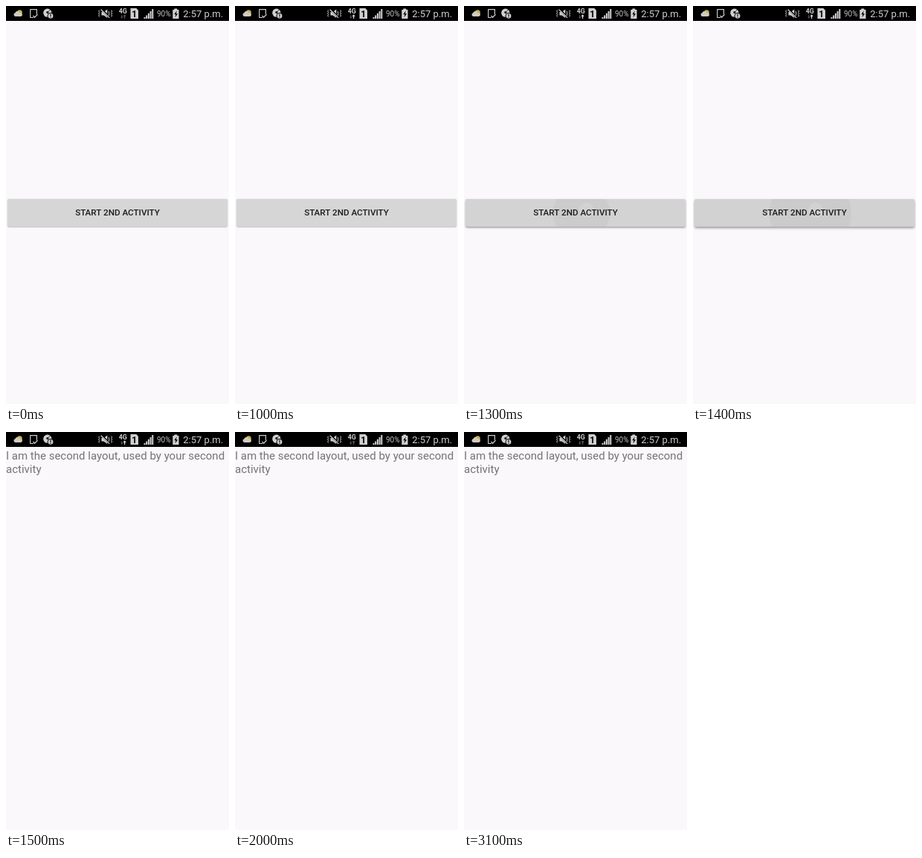
These frames come from a looping animation (300 px wide and 534 px high, 4.2 s). An HTML page:

```html
<!DOCTYPE html>
<html lang="en">
<head>
<meta charset="utf-8">
<title>Second activity</title>
<style>
  html, body { margin: 0; width: 100%; height: 100%; overflow: hidden; background: #faf8fb; }
  body { position: relative; font-family: Roboto, sans-serif; }
  .status { position: absolute; left: 0; top: 0; width: 300px; height: 20px; background: #000; }
  .screen { position: absolute; left: 0; top: 20px; width: 300px; height: 514px; overflow: hidden; }

  .first, .second, .button, .tint, .ripple, .touch, .up {
    animation: 4200ms step-end infinite;
  }
  .button {
    position: absolute; left: 2px; top: 239px; width: 296px; height: 37px;
    border-radius: 2px; background: #d6d6d7; overflow: hidden;
    animation-name: lift;
  }
  .label {
    position: absolute; left: 0; width: 100%; top: 0; line-height: 37px;
    text-align: center; font-size: 11.67px; font-weight: 500; color: #1c1c1c;
    white-space: nowrap;
  }
  .tint { position: absolute; inset: 0; background: rgba(0, 0, 0, .02); animation-name: press; }
  .ripple {
    position: absolute; left: 101px; top: -36px; width: 110px; height: 110px;
    border-radius: 50%; background: rgba(0, 0, 0, .03); animation-name: grow;
  }
  .touch {
    position: absolute; left: 153px; top: 5px; width: 20px; height: 20px;
    border-radius: 50%; background: rgba(255, 255, 255, .15); animation-name: press;
  }
  .second {
    position: absolute; left: 0; top: 3px; font-size: 15px; line-height: 18px;
    color: #747474; white-space: nowrap; animation-name: arrive;
  }
  .first { animation-name: leave; }
  .up { animation-name: upload; }

  @keyframes leave { 0% { visibility: visible } 35.714%, 100% { visibility: hidden } }
  @keyframes arrive { 0% { visibility: hidden } 35.714%, 100% { visibility: visible } }
  @keyframes press { 0% { opacity: 0 } 28.571% { opacity: .5 } 30.952% { opacity: .8 } 33.333%, 100% { opacity: 1 } }
  @keyframes grow {
    0% { transform: scale(0) }
    28.571% { transform: scale(.35) }
    30.952% { transform: scale(.7) }
    33.333%, 100% { transform: scale(1) }
  }
  @keyframes lift {
    0% { box-shadow: 0 .5px 1.5px rgba(0, 0, 0, .38) }
    28.571% { box-shadow: 0 1px 2px rgba(0, 0, 0, .38) }
    30.952% { box-shadow: 0 1.5px 2.5px rgba(0, 0, 0, .38) }
    33.333%, 100% { box-shadow: 0 2px 3.5px rgba(0, 0, 0, .38) }
  }
  @keyframes upload { 0% { fill: #555 } 23.809% { fill: #ddd } 47.619%, 100% { fill: #555 } }
</style>
</head>
<body>
<svg class="status" width="300" height="20" viewBox="0 0 300 20" fill="#d0d0d0" font-family="Roboto, sans-serif">
  <!-- weather -->
  <circle cx="18.3" cy="8.8" r="3.5" fill="#cdb04c"/>
  <path d="M12.5 14a2.4 2.4 0 0 1-.2-4.7a3.3 3.3 0 0 1 6.2-.2a2.5 2.5 0 0 1 1.6 4.9z" fill="#cfccc0"/>
  <!-- document -->
  <path d="M37 15.5H32.7V4.7H41.4V11" fill="none" stroke="#c8c8c8" stroke-width="1.2"/>
  <path d="M36.5 13l2 2.2 4-4" fill="none" stroke="#c8c8c8" stroke-width="1.3"/>
  <!-- disc with alert -->
  <circle cx="55.8" cy="9.2" r="5.6"/>
  <circle cx="55.8" cy="8.6" r="1.5" fill="#000"/>
  <path d="M56 8.5L59.5 5" stroke="#000" stroke-width=".8"/>
  <circle cx="60" cy="13.3" r="4" stroke="#000"/>
  <path d="M60 10.8v3M60 14.6v1.2" stroke="#000" stroke-width="1.2"/>
  <!-- vibrate, muted -->
  <path d="M128.5 8h3l4.8-3.6v11.6l-4.8-3.6h-3z"/>
  <g fill="none" stroke="#d0d0d0">
    <path d="M128.3 4.2l11 11.3" stroke="#000" stroke-width="2.6"/>
    <path d="M127.7 4.7l11.5 11.2" stroke-width="1.3"/>
    <path d="M138.2 7q1.4 3 0 6"/>
    <path d="M125.8 5.5l-1.2 1.5 1.2 1.5-1.2 1.5 1.2 1.5-1.2 1.5 1.2 1.5M141.5 5.5l1.2 1.5-1.2 1.5 1.2 1.5-1.2 1.5 1.2 1.5-1.2 1.5"/>
  </g>
  <!-- network -->
  <text x="151.8" y="9.8" font-size="8.8" font-weight="700">4G</text>
  <path d="M155.3 11.8h1v2.8h1.3l-1.8 2.3-1.8-2.3h1.3z" fill="#555"/>
  <path class="up" d="M159 17v-3h-1.5l2.1-2.7 2.1 2.7h-1.5v3z"/>
  <path d="M167.5 3h7.8l2.7 2.7V17H167.5z"/>
  <text x="172.7" y="14.5" font-size="12" font-weight="700" fill="#000" text-anchor="middle">1</text>
  <path d="M185.5 15h2v2h-2zM188.2 12.5h2V17h-2zM190.9 9.8h2V17h-2zM193.6 7h2v10h-2zM196.3 4h2v13h-2z"/>
  <!-- power and time -->
  <text x="203" y="14" font-size="10" fill="#c4c4c4">90%</text>
  <path d="M226.3 3.5h4V5h2.2v12h-8.2V5h2z"/>
  <path d="M229.8 6.3l-3.6 5h2.2l-1 4.2 3.7-5.3h-2.2z" fill="#000"/>
  <text x="238.3" y="15" font-size="13">2:57 p.m.</text>
</svg>
<div class="screen">
  <div class="first">
    <div class="button">
      <div class="tint"></div>
      <div class="ripple"></div>
      <div class="touch"></div>
      <div class="label">START 2ND ACTIVITY</div>
    </div>
  </div>
  <div class="second">I am the second layout, used by your second<br>activity</div>
</div>
</body>
</html>
```
